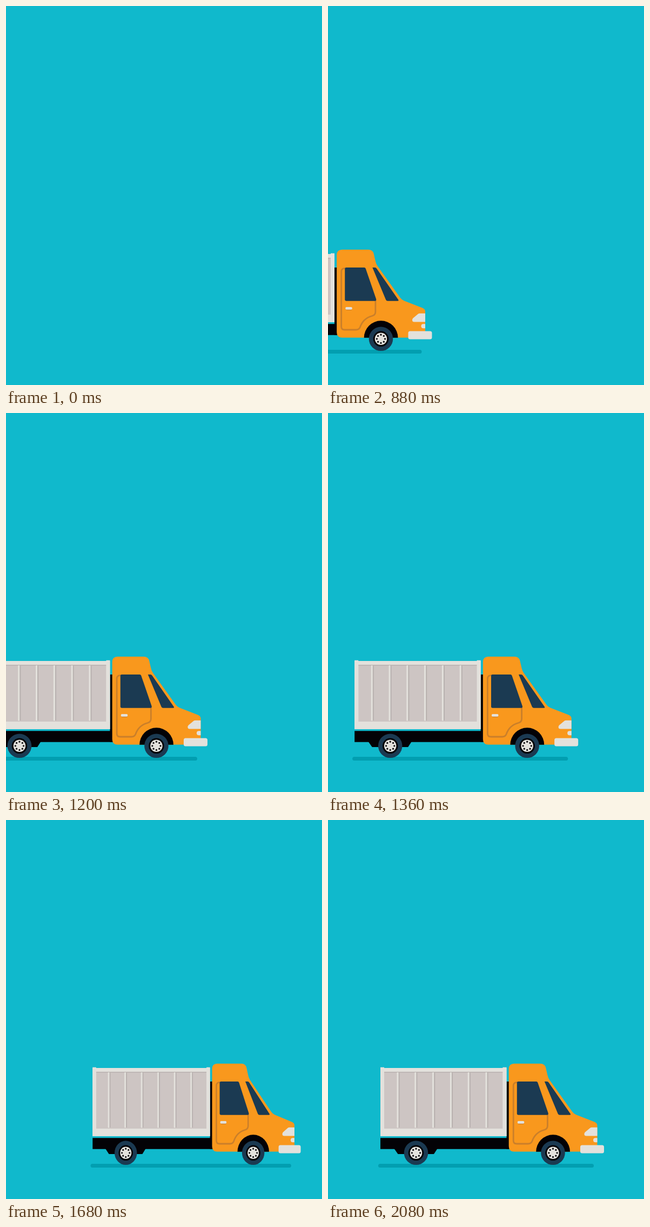
An HTML page with a canvas for the animation above (2400 ms loop, 585 by 700 pixels).

```html
<!DOCTYPE html>
<html lang="en">
<head>
<meta charset="utf-8">
<title>Delivery truck</title>
<style>
  html, body { margin: 0; width: 100%; height: 100%; overflow: hidden; background: #10b9cc; }
  canvas { display: block; }
</style>
</head>
<body>
<canvas id="stage" width="585" height="700"></canvas>
<script>
const ctx = document.getElementById('stage').getContext('2d');
const LOOP = 2400, TICK = 40, ENTER = 560;
const SKY = '#10b9cc', SHADE = '#029eb0', BLACK = '#030206', LIGHT = '#e3e1dc',
      PANEL = '#cdc5c3', GROOVE = '#b9b2b0', ORANGE = '#f9981d', SEAM = '#ca7f2a', NAVY = '#1b3a52';
const REST = 93;

// [time, value] keys with straight segments
const LEFT = [[560, -406], [1440, 90.3], [1680, 156.6], [2080, REST]];
const SQUASH = [[1440, 1], [1760, 0.9075], [2080, 1]];

function track(keys, t) {
  if (t <= keys[0][0]) return keys[0][1];
  for (let i = 1; i < keys.length; i++) {
    const [t0, a] = keys[i - 1], [t1, b] = keys[i];
    if (t <= t1) return a + (b - a) * (t - t0) / (t1 - t0);
  }
  return keys[keys.length - 1][1];
}

function rect(color, x0, y0, x1, y1, r = 0) {
  ctx.fillStyle = color;
  ctx.beginPath();
  ctx.roundRect(x0, y0, x1 - x0, y1 - y0, r);
  ctx.fill();
}

function disc(color, x, y, r) {
  ctx.fillStyle = color;
  ctx.beginPath();
  ctx.arc(x, y, r, 0, Math.PI * 2);
  ctx.fill();
}

function shape(color, d) {
  ctx.fillStyle = color;
  ctx.fill(new Path2D(d));
}

function wheel(x) {
  const y = 614.8;
  disc(NAVY, x, y, 22.3);
  disc(BLACK, x, y, 14.3);
  disc(LIGHT, x, y, 11.3);
  for (let i = 0; i < 8; i++) {
    const a = i * Math.PI / 4;
    disc(BLACK, x + 7.6 * Math.cos(a), y + 7.6 * Math.sin(a), 1.6);
  }
}

function cargo() {
  rect(LIGHT, 97, 458, 330.5, 584);
  rect(PANEL, 104, 465, 323.7, 570);
  rect(GROOVE, 104, 465, 323.7, 466.5);
  for (let i = 0; i < 6; i++) {
    const x = 127.5 + i * 32.8;
    rect(GROOVE, x + 2.8, 466.5, x + 5.2, 568);
    rect(LIGHT, x, 466, x + 3, 568.5, 1);
  }
  rect(LIGHT, 97, 456.7, 104, 584);
  rect(LIGHT, 323.5, 456.7, 330.5, 584);
}

function cab() {
  shape(ORANGE, 'M334.7 460Q334.7 450 344.7 450H393Q401.5 450 403.3 458L406.3 471Q407.3 476 410 480' +
    'L452 538.5Q455 542.8 459.5 544.5L493 557.5Q498.5 559.8 498.5 564V612.6H344.7Q334.7 612.6 334.7 602.6Z');
  ctx.strokeStyle = SEAM;
  ctx.lineWidth = 2.8;
  ctx.stroke(new Path2D('M352 484.6H349.5Q343.2 484.6 343.2 491V592Q343.2 598 349.2 598H370.5' +
    'Q376 598 378 593C381.5 583 389 575.5 400 572.5Q406.4 570.8 406.4 565V543'));
  shape(NAVY, 'M352.5 483H385.5Q387.6 483 388.3 485L407.6 541Q408.6 544.7 405.5 544.7H352.5' +
    'Q349.8 544.7 349.8 542V485.7Q349.8 483 352.5 483Z');
  shape(NAVY, 'M400.8 483H405.5Q407.3 483 408.5 484.8L448.7 542.5Q450 544.7 447.5 544.7H429' +
    'Q426.6 544.7 425.6 542.5Z');
  rect(SEAM, 352, 558, 362.5, 562, 1.5);
  rect(LIGHT, 350.8, 556, 363.3, 560.8, 2);
  shape(LIGHT, 'M498.5 567.8H488.5Q486.5 567.8 485 569L476 576.5Q474.4 578 474.4 580Q474.6 583.6 478 583.6H498.5Z');
  shape(LIGHT, 'M498.5 587.3H495Q491 587.3 491 591.2Q491 595.2 495 595.2H498.5Z');
  shape(BLACK, 'M385.2 612.7A31.4 31.4 0 0 1 448 612.7Z');
  rect(LIGHT, 467, 600.4, 511, 615.4, 3.5);
}

function truck() {
  rect(SHADE, REST, 635, 492, 642, 3.5);
  rect(BLACK, 97, 587.3, 340, 607.8);
  rect(BLACK, 330.5, 483, 340, 607.8);
  shape(BLACK, 'M122.5 607H202.5L196 617H129.5Z');
  cargo();
  cab();
  wheel(163);
  wheel(416.5);
}

function draw(now) {
  const t = Math.floor((now % LOOP) / TICK) * TICK;
  ctx.fillStyle = SKY;
  ctx.fillRect(0, 0, 585, 700);
  if (t >= ENTER) {
    ctx.save();
    ctx.translate(track(LEFT, t), 0);
    ctx.scale(track(SQUASH, t), 1);
    ctx.translate(-REST, 0);
    truck();
    ctx.restore();
  }
}

const start = performance.now();
function loop() {
  draw(performance.now() - start);
  requestAnimationFrame(loop);
}
loop();
</script>
</body>
</html>
```
